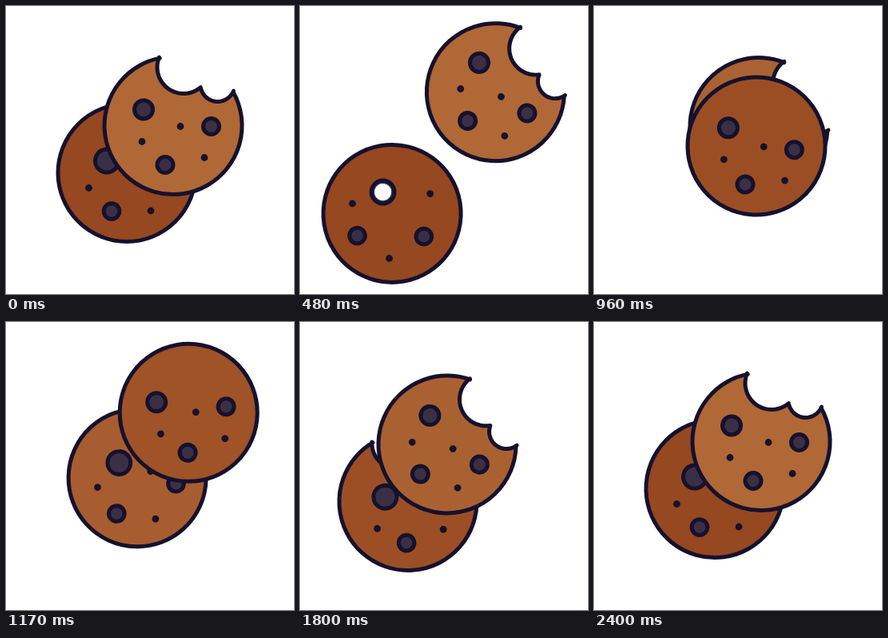
These frames come from a looping animation (360 by 360 pixels, 3.43 s). An HTML page with a canvas:

```html
<!DOCTYPE html>
<html lang="en">
<head>
<meta charset="utf-8">
<title>Cookies</title>
<style>
  html, body { margin: 0; width: 100%; height: 100%; overflow: hidden; background: #fff; }
  canvas { display: block; width: 100vw; height: 100vh; }
</style>
</head>
<body>
<canvas id="stage"></canvas>
<script>
const SIZE = 360, LOOP = 3430, MOVE_END = 2400, STEP = 30;
const R = 86, INK = '#16112d', CHIP = '#3a3045';
const LIGHT = [176, 104, 54], DARK = [150, 72, 32];

const canvas = document.getElementById('stage');
const ctx = canvas.getContext('2d');
const scale = Math.max(1, window.devicePixelRatio || 1);
canvas.width = canvas.height = SIZE * scale;

// Chips as x, y, radius; radius 0 marks a crumb
const FRONT = [[-37, -20, 11.5], [47.5, 1, 10], [-10, 49, 10], [9, 1, 0], [-39, 20, 0], [39, 40, 0]];
const BACK = [[-25, -15, 14.5], [49, 0, 9.8], [-19, 48, 9.8], [24, -48, 0], [-47.5, 19, 0], [30, 47.5, 0]];
const BACK_BITTEN = BACK.map((c, i) => i === 3 ? [15.5, -11, 0] : c);

// Tracks: time, values...
const first = {
  pos: [[0, 209, 149.5], [240, 232, 123.5], [500, 244.5, 107.5], [720, 241, 111], [960, 206, 150.5],
        [1410, 129, 231], [1560, 125.5, 234.5], [1800, 135, 224.5], [2400, 151, 208.5]],
  rot: [[0, 0], [240, 4], [660, 49], [720, 47.5], [960, 33], [1410, -14.5], [1720, -20], [1800, -19.5], [2400, 0]]
};
const second = {
  pos: [[0, 151, 208.5], [240, 127, 247], [500, 115, 259.5], [720, 122, 255], [960, 203, 175],
        [1310, 234.5, 94], [1410, 234.5, 103], [1620, 212, 128], [1800, 184, 153], [1860, 182.5, 154.5], [2400, 209, 149.5]],
  rot: [[0, 0], [240, 22.5], [500, 36], [720, 32], [960, 4.5], [1310, -14.5], [1410, -12.6], [1800, 30.7], [1880, 33], [2400, 0]]
};

const mix = (a, b, k) => a + (b - a) * k;
const ramp = (t, from, to) => Math.min(1, Math.max(0, (t - from) / (to - from)));
const ease = (t, from, to) => { const k = ramp(t, from, to); return k * k * (3 - 2 * k); };

// Monotone cubic interpolation of one column
function sample(keys, t, col) {
  const rise = i => (keys[i + 1][col] - keys[i][col]) / (keys[i + 1][0] - keys[i][0]);
  const slope = i => {
    if (i === 0 || i === keys.length - 1) return 0;
    const a = rise(i - 1), b = rise(i);
    return a * b <= 0 ? 0 : 2 * a * b / (a + b);
  };
  let i = 0;
  while (i < keys.length - 2 && t > keys[i + 1][0]) i++;
  const h = keys[i + 1][0] - keys[i][0];
  const u = ramp(t, keys[i][0], keys[i + 1][0]), v = 1 - u;
  return keys[i][col] * v * v * (1 + 2 * u) + keys[i + 1][col] * u * u * (3 - 2 * u)
    + h * u * v * (slope(i) * v - slope(i + 1) * u);
}

// Bite arc, flattened onto the rim as depth goes to 0
function biteArc(cx, cy, r, from, to, depth) {
  const n = 20;
  for (let i = 0; i <= n; i++) {
    const a = mix(from, to, i / n) * Math.PI / 180;
    const x = cx + r * Math.cos(a), y = cy + r * Math.sin(a);
    const k = mix(R / Math.hypot(x, y), 1, depth);
    ctx.lineTo(x * k, y * k);
  }
}

function outline(bite) {
  ctx.beginPath();
  if (bite > 0) {
    ctx.arc(0, 0, R, -29.3 * Math.PI / 180, 258.7 * Math.PI / 180);
    biteArc(13, -73, 33, 201.8, 49.8, bite);
    biteArc(55.5, -51.5, 21.5, 167.6, 22, bite);
  } else {
    ctx.arc(0, 0, R, 0, Math.PI * 2);
  }
  ctx.closePath();
}

function disc(x, y, r, fill) {
  ctx.beginPath();
  ctx.arc(x, y, r, 0, Math.PI * 2);
  ctx.fillStyle = fill;
  ctx.fill();
}

function drawCookie(track, t, look) {
  ctx.save();
  ctx.translate(sample(track.pos, t, 1), sample(track.pos, t, 2));
  ctx.rotate(sample(track.rot, t, 1) * Math.PI / 180);
  outline(look.bite);
  ctx.fillStyle = `rgb(${DARK.map((c, i) => Math.round(mix(c, LIGHT[i], look.light)))})`;
  ctx.fill();
  ctx.stroke();
  look.from.forEach((chip, i) => {
    const [x, y, r] = chip.map((v, j) => mix(v, look.to[i][j], look.morph));
    if (!r) return disc(x, y, 4.4, INK);
    disc(x, y, r + 2.5, INK);
    disc(x, y, r - 2.5, CHIP);
    if (i === 0 && look.hole > 0) disc(x, y, (r - 2.5) * look.hole, '#fff');
  });
  ctx.restore();
}

function draw(t) {
  ctx.setTransform(scale, 0, 0, scale, 0, 0);
  ctx.fillStyle = '#fff';
  ctx.fillRect(0, 0, SIZE, SIZE);
  ctx.strokeStyle = INK;
  ctx.lineWidth = 5;
  ctx.lineJoin = 'round';

  const swap = ramp(t, 700, 2120);
  const bitten = () => drawCookie(first, t, {
    from: FRONT, to: BACK_BITTEN, morph: ease(t, 900, 1200), bite: 1, light: 1 - swap, hole: 0
  });
  const whole = () => drawCookie(second, t, {
    from: BACK, to: FRONT, morph: ease(t, 730, 980), bite: ease(t, 1440, 1650), light: swap,
    hole: ease(t, 0, 180) * (1 - ramp(t, 440, 790))
  });
  const order = t < 720 ? [whole, bitten] : [bitten, whole];
  order.forEach(paint => paint());
}

const start = performance.now();
function tick() {
  const t = (performance.now() - start) % LOOP;
  draw(Math.min(MOVE_END, Math.floor(t / STEP) * STEP));
  requestAnimationFrame(tick);
}
tick();
</script>
</body>
</html>
```
